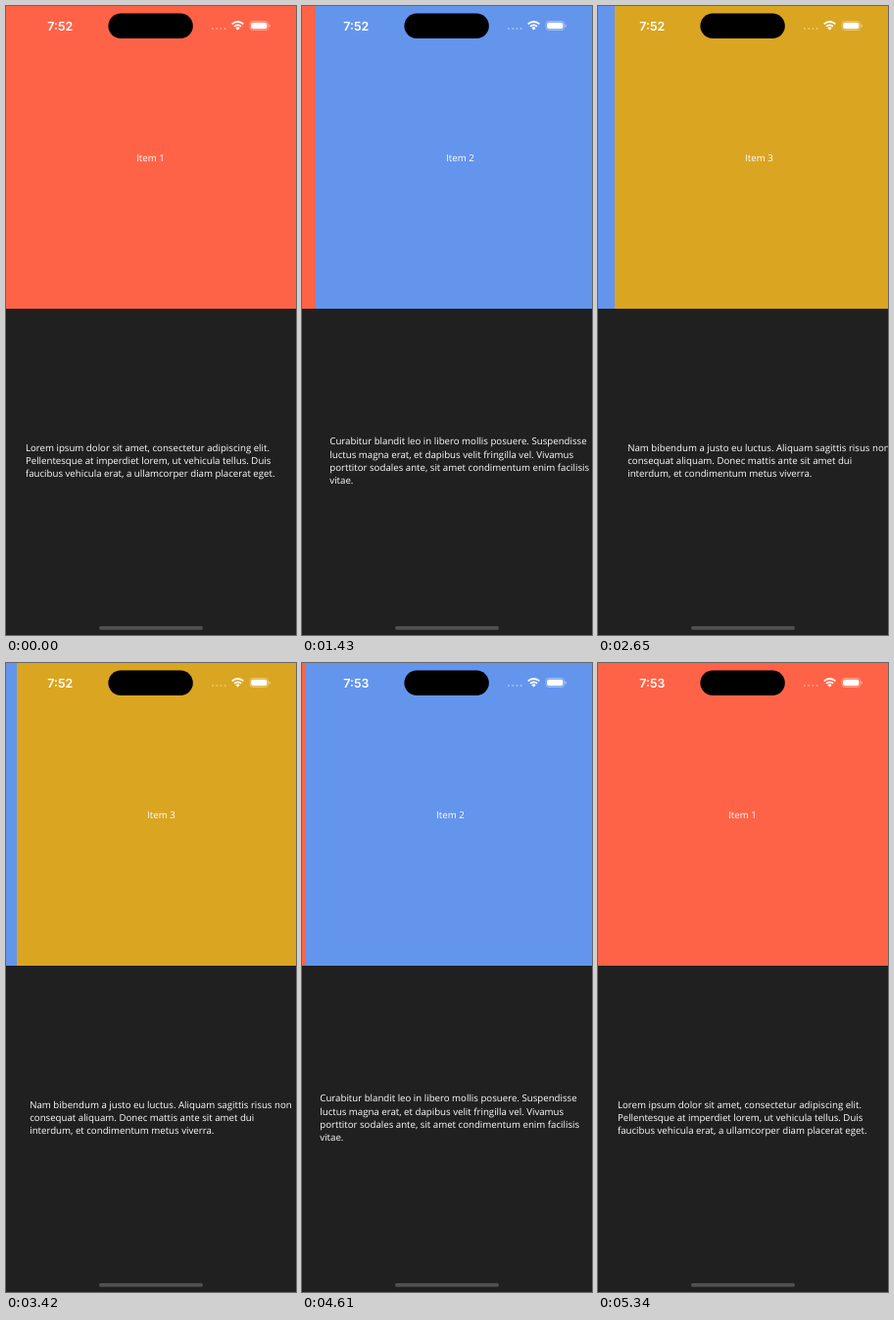
Write an HTML page that moves like this. It is 296 px wide and 640 px high and loops after 6360 ms.

```html
<!DOCTYPE html>
<html lang="en">
<head>
<meta charset="utf-8">
<title>Paged carousel</title>
<style>
  html, body { margin: 0; width: 100%; height: 100%; overflow: hidden; background: #202020; }
  svg { display: block; width: 296px; height: 640px; }
  text { fill: #fff; text-rendering: geometricPrecision; white-space: pre; }
  .copy { font: 9.68px "Open Sans", sans-serif; }
  .clock { font: 600 12.4px Inter, sans-serif; }
</style>
</head>
<body>
<svg viewBox="0 0 296 640">
  <rect width="296" height="640" fill="#202020"/>
  <g id="pages"></g>
  <rect x="104.4" y="7.6" width="86.4" height="25.5" rx="12.75"/>
  <text id="clock" class="clock" x="55.3" y="24.6" text-anchor="middle"></text>
  <g fill="#fff">
    <path d="M211 23 h13" stroke="#fff" stroke-width="2" stroke-linecap="round" stroke-dasharray="0 4.2" opacity=".4"/>
    <path d="M236.5 24.6 l-2.1 -2.2 a3 3 0 0 1 4.2 0z"/>
    <g fill="none" stroke="#fff" stroke-width="1.8">
      <path d="M233 20.9 a5 5 0 0 1 7 0"/>
      <path d="M230.7 18.3 a8.4 8.4 0 0 1 11.6 0"/>
    </g>
    <rect x="249" y="15.5" width="18.6" height="9" rx="2.8" fill="none" stroke="#fff" stroke-width=".8" opacity=".45"/>
    <rect x="250.2" y="16.7" width="16.2" height="6.6" rx="1.8"/>
    <path d="M268.7 18.5 q1.4 .5 1.4 1.5 t-1.4 1.5z" opacity=".5"/>
  </g>
  <rect x="95" y="631" width="106" height="3.7" rx="1.85" fill="#505050"/>
</svg>
<script>
const WIDTH = 296, LOOP = 6360, LINE = 13.1, COPY_MIDDLE = 466.1;

const pages = [
  { color: "#ff6347", x: 19.9, lines: [
    "Lorem ipsum dolor sit amet, consectetur adipiscing elit.",
    "Pellentesque at imperdiet lorem, ut vehicula tellus. Duis",
    "faucibus vehicula erat, a ullamcorper diam placerat eget."] },
  { color: "#6495ed", x: 14.3, lines: [
    "Curabitur blandit leo in libero mollis posuere. Suspendisse",
    "luctus magna erat, et dapibus velit fringilla vel. Vivamus",
    "porttitor sodales ante, sit amet condimentum enim facilisis",
    "vitae."] },
  { color: "#daa520", x: 13.2, lines: [
    "Nam bibendum a justo eu luctus. Aliquam sagittis risus non",
    "consequat aliquam. Donec mattis ante sit amet dui",
    "interdum, et condimentum metus viverra."] }
];

// lead: pixels already travelled on the first step; tail: pixels left on the fifth.
const swipes = [
  { from: 0, to: 1, start: 1000, step: 106, lead: 11, tail: 14 },
  { from: 1, to: 2, start: 2210, step: 108, lead: 11, tail: 17 },
  { from: 2, to: 1, start: 3420, step: 106, lead: 11, tail: 13 },
  { from: 1, to: 0, start: 4610, step: 116, lead: 4, tail: 14 }
];

const strip = document.getElementById("pages");
const clock = document.getElementById("clock");

strip.innerHTML = pages.map(({ color, x, lines }, i) => {
  const top = COPY_MIDDLE - (lines.length - 1) / 2 * LINE;
  return `<g transform="translate(${i * WIDTH})">
    <rect width="${WIDTH}" height="308" fill="${color}"/>
    <text class="copy" x="147.4" y="157.6" text-anchor="middle">Item ${i + 1}</text>
    ${lines.map((line, n) => `<text class="copy" x="${x}" y="${top + n * LINE}">${line}</text>`).join("")}
  </g>`;
}).join("");

const logit = p => Math.log(p / (1 - p));
const sigmoid = v => 1 / (1 + Math.exp(-v));

// An S-curve sampled in held steps, at rest from the seventh one on.
function progress({ start, step, lead, tail }, time) {
  const k = Math.floor((time - start) / step);
  if (k < 0) return 0;
  if (k > 5) return 1;
  const first = logit(lead / WIDTH), fifth = logit(1 - tail / WIDTH);
  return sigmoid(first + (fifth - first) * k / 4);
}

function draw(time) {
  const page = swipes.reduce((sum, s) => sum + (s.to - s.from) * progress(s, time), 0);
  strip.setAttribute("transform", `translate(${-page * WIDTH})`);
  clock.textContent = time < 4370 ? "7:52" : "7:53";
}

const origin = performance.now();
function tick() {
  draw((performance.now() - origin) % LOOP);
  requestAnimationFrame(tick);
}
tick();
</script>
</body>
</html>
```
